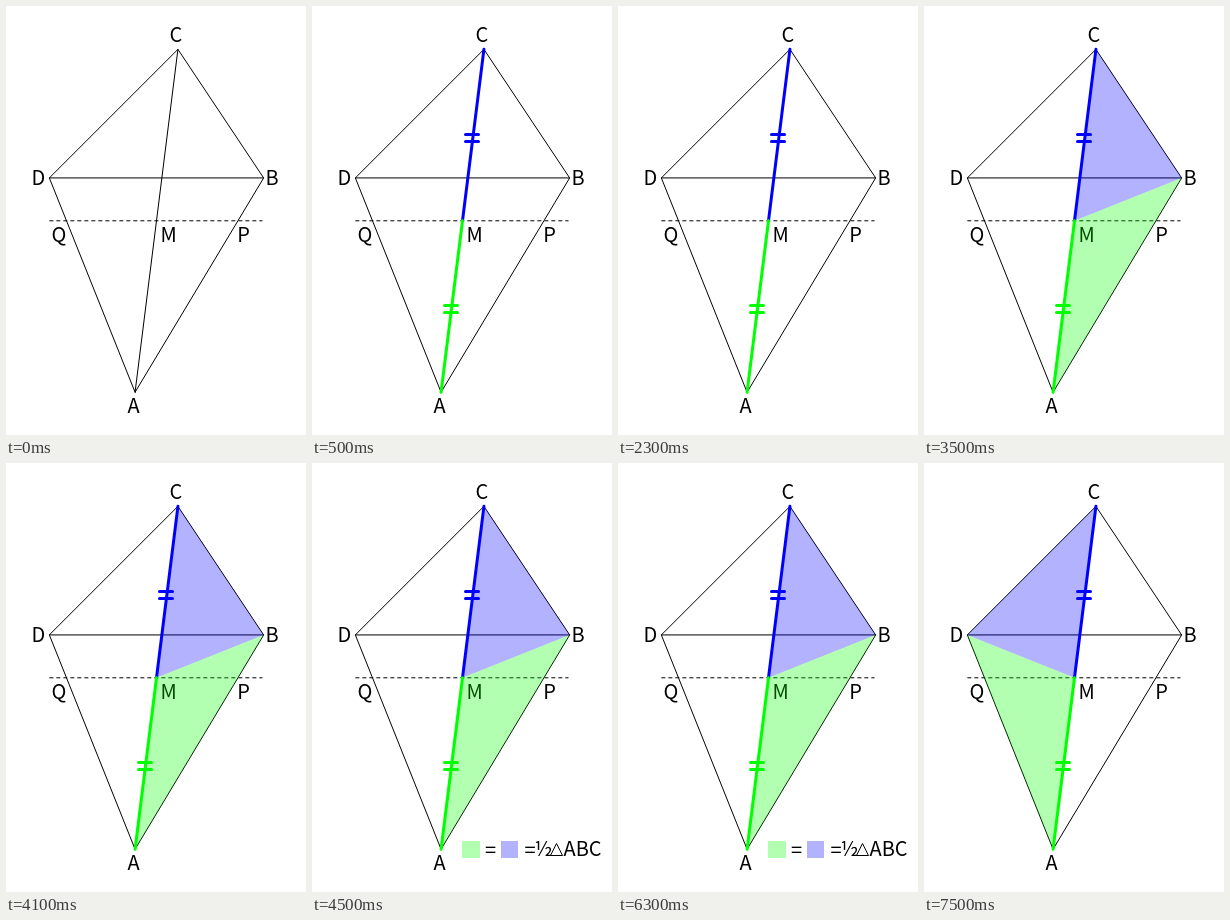
An HTML page with a canvas that plays this animation: 300 by 429 pixels, repeating every 8 s.

```html
<!DOCTYPE html>
<html lang="en">
<head>
<meta charset="utf-8">
<title>Equal areas from a median</title>
<style>
  html, body { margin: 0; width: 100%; height: 100%; overflow: hidden; background: #fff; }
  canvas { display: block; width: 300px; height: 429px; }
</style>
</head>
<body>
<canvas id="stage"></canvas>
<script>
const WIDTH = 300, HEIGHT = 429, LOOP = 8000;
const canvas = document.getElementById('stage');
const ctx = canvas.getContext('2d');
const scale = window.devicePixelRatio || 1;
canvas.width = WIDTH * scale;
canvas.height = HEIGHT * scale;
ctx.scale(scale, scale);
ctx.lineCap = 'round';

// The figure sits on a grid seven cells wide.
const CELL = WIDTH / 7;
const grid = (col, row) => [col * CELL + 0.5, row * CELL + 0.5];
const A = grid(3, 9), B = grid(6, 4), C = grid(4, 1), D = grid(1, 4);
const M = grid(3.5, 5);
const BLUE = '#00f', GREEN = '#0f0';
const PALE_BLUE = 'rgba(0,0,255,.3)', PALE_GREEN = 'rgba(0,255,0,.3)';

function trace(points) {
  ctx.beginPath();
  points.forEach(p => ctx.lineTo(...p));
}

function line(points, color = '#000', width = 1) {
  trace(points);
  ctx.strokeStyle = color;
  ctx.lineWidth = width;
  ctx.stroke();
}

function area(points, color) {
  trace(points);
  ctx.fillStyle = color;
  ctx.fill();
}

function text(string, x, y) {
  ctx.font = '20px "Noto Sans CJK JP", "Noto Sans CJK SC", "Noto Sans", sans-serif';
  ctx.textAlign = 'center';
  ctx.fillStyle = '#000';
  ctx.fillText(string, x, y);
}

function drawFigure() {
  line([A, B, C, D, A]);
  line([D, B]);
  line([A, C]);
  ctx.lineCap = 'butt';
  ctx.setLineDash([4, 3]);
  line([grid(1, 5), [256.5, M[1]]]);
  ctx.setLineDash([]);
  ctx.lineCap = 'round';
  text('C', 170, 36);
  text('D', 32.5, 179);
  text('B', 266, 179);
  text('Q', 53, 236);
  text('M', 162.5, 236);
  text('P', 237.5, 236);
  text('A', 127.5, 407);
}

// One half of the diagonal with its double equality tick.
function drawHalf(from, to, color, tickX, tickY) {
  line([from, to], color, 3);
  for (const y of [tickY, tickY + 7]) {
    line([[tickX, y], [tickX + 13, y]], color, 3);
  }
}

function drawLegend() {
  ctx.fillStyle = PALE_GREEN;
  ctx.fillRect(150, 378, 18, 17);
  ctx.fillStyle = PALE_BLUE;
  ctx.fillRect(189, 378, 17, 17);
  text('=', 178.5, 394);
  text('=', 218, 394);
  text('½', 231.5, 393);
  line([[238.5, 392.5], [244.5, 380.5], [250.5, 392.5], [238.5, 392.5]]);
  text('ABC', 270.5, 393);
}

function draw(time) {
  ctx.fillStyle = '#fff';
  ctx.fillRect(0, 0, WIDTH, HEIGHT);
  drawFigure();
  if (time >= 3500) {
    const side = time < 7500 ? B : D;
    area([M, C, side], PALE_BLUE);
    area([M, A, side], PALE_GREEN);
  }
  if (time >= 500) {
    drawHalf(C, M, BLUE, 153.5, 128.5);
    drawHalf(M, A, GREEN, 132.5, 299.5);
  }
  if (time >= 4500 && time < 7500) drawLegend();
}

const start = performance.now();
function tick() {
  draw((performance.now() - start) % LOOP);
  requestAnimationFrame(tick);
}
tick();
</script>
</body>
</html>
```
